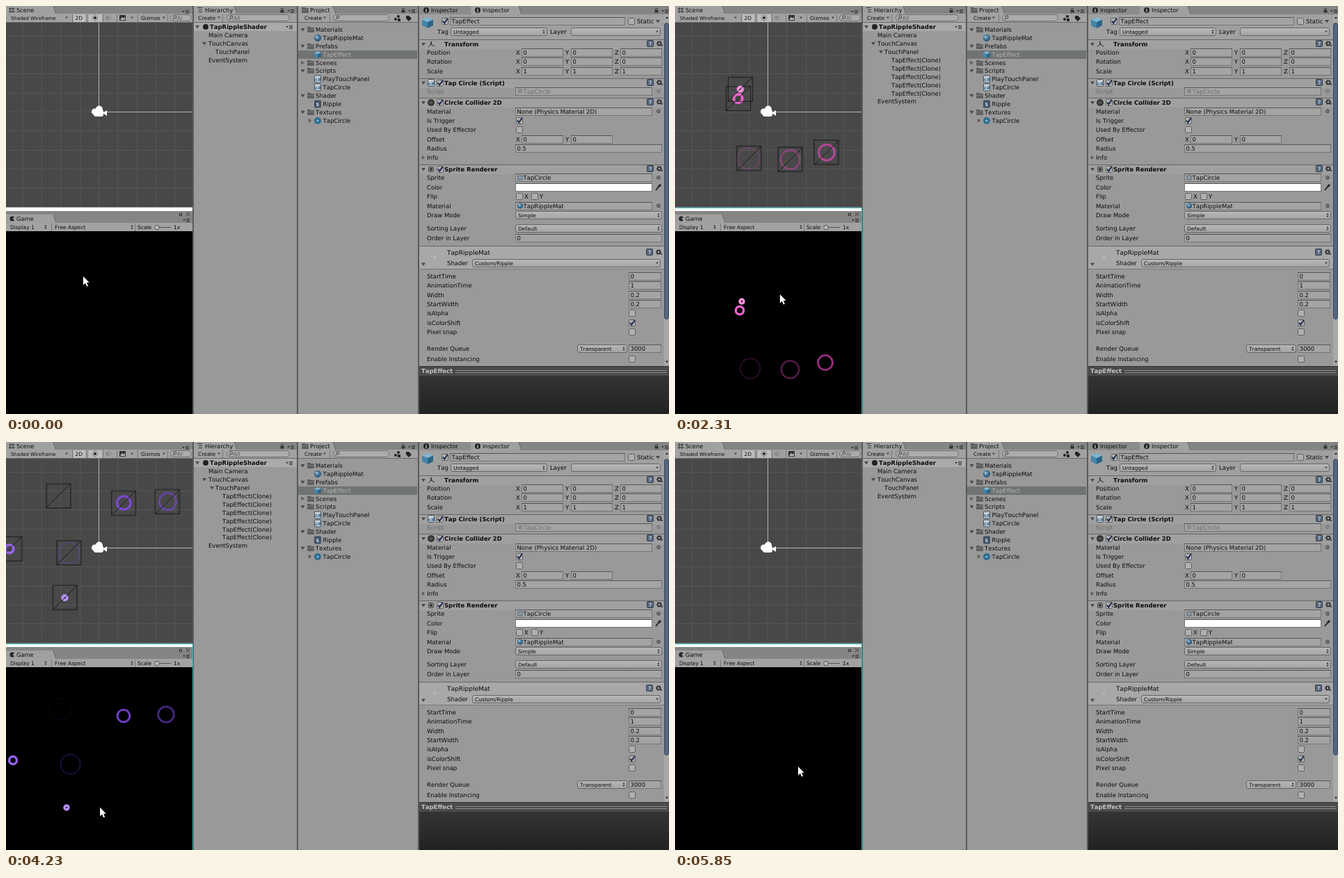
Write an HTML page with a canvas that moves like this. It is 953x587 px and loops after 6.31 s.

```html
<!DOCTYPE html>
<html lang="en">
<head>
<meta charset="utf-8">
<title>Tap ripple editor</title>
<style>
html, body { margin: 0; width: 100%; height: 100%; overflow: hidden; background: #999; }
canvas { display: block; width: 953px; height: 587px; }
</style>
</head>
<body>
<canvas id="stage" width="953" height="587"></canvas>
<script>
const LOOP = 6310, STEP = 76.75, LIFE = 1060, SCALE = 1.0345;
const view = document.getElementById('stage').getContext('2d');
const base = document.createElement('canvas');
base.width = 953;
base.height = 587;
let g = base.getContext('2d');
for (const c of [view, g]) {
  c.textRendering = 'geometricPrecision';
  c.fontKerning = 'none';
}

// Taps and pointer waypoints: time, x, y
const taps = [
  [250, 67, 366], [510, 207, 406], [760, 201, 452], [1010, 79, 457.5], [1210, 72, 476],
  [1410, 108, 521.5], [1540, 165.5, 523], [1700, 216, 513], [2030, 93, 438], [2200, 96, 425],
  [2350, 183, 420], [2540, 109, 483], [2670, 90, 515], [2880, 217, 475.5], [3120, 125, 335],
  [3260, 78, 384], [3350, 92.5, 463.5], [3560, 230, 392], [3730, 169, 394], [3960, 10, 458],
  [4120, 87, 526], [4340, 165, 497], [4500, 164.5, 436], [4700, 222, 495.5]
];
const path = taps.concat([
  [0, 111, 389], [90, 111, 389], [1466, 121, 523], [2311, 151, 415], [3078, 139, 343],
  [4229, 135, 526], [5100, 179, 469], [5300, 179, 469], [5800, 177, 467], [LOOP, 177, 467]
]).sort((a, b) => a[0] - b[0]);
const hues = [[0, 383], [1460, 347], [2310, 314], [3080, 287], [4230, 262], [5310, 233], [LOOP, 215]];

function sample(keys, t, col) {
  const i = Math.max(1, keys.findIndex(k => k[0] >= t));
  const a = keys[i - 1], b = keys[i];
  return a[col] + (b[col] - a[col]) * (t - a[0]) / (b[0] - a[0]);
}

function rect(x, y, w, h, fill) {
  g.fillStyle = fill;
  g.fillRect(x, y, w, h);
}
function text(s, x, y, size = 8.5, color = '#0c0c0c', bold = false) {
  g.font = `${bold ? 'bold ' : ''}${size}px "DejaVu Sans", sans-serif`;
  g.fillStyle = color;
  g.fillText(s, x, y + 3);
}
const bold = (s, x, y) => text(s, x, y, 8.5, '#0c0c0c', true);
function line(color, width, ...p) {
  g.strokeStyle = color;
  g.lineWidth = width;
  g.beginPath();
  for (let i = 0; i < p.length; i += 2) g.lineTo(p[i], p[i + 1]);
  g.stroke();
}
function poly(color, ...p) {
  g.fillStyle = color;
  g.beginPath();
  for (let i = 0; i < p.length; i += 2) g.lineTo(p[i], p[i + 1]);
  g.fill();
}
function disc(x, y, r, fill) {
  g.fillStyle = fill;
  g.beginPath();
  g.arc(x, y, r, 0, 7);
  g.fill();
}
function ring(x, y, r, w, color) {
  g.strokeStyle = color;
  g.lineWidth = w;
  g.beginPath();
  g.arc(x, y, r, 0, 2 * Math.PI);
  g.stroke();
}
function rounded(x, y, w, h, r, fill, edge) {
  g.beginPath();
  g.roundRect(x + .5, y + .5, w - 1, h - 1, r);
  g.fillStyle = fill;
  g.fill();
  g.strokeStyle = edge;
  g.lineWidth = 1;
  g.stroke();
}
const down = (x, y, r = 3, c = '#4a4a4a') => poly(c, x - r, y - r * .7, x + r, y - r * .7, x, y + r * .8);
const right = (x, y, r = 3, c = '#5c5c5c') => poly(c, x - r * .7, y - r, x + r * .8, y, x - r * .7, y + r);
function spin(x, y) {
  poly('#222', x - 1.6, y - .8, x + 1.6, y - .8, x, y - 3);
  poly('#222', x - 1.6, y + .8, x + 1.6, y + .8, x, y + 3);
}
function field(x, y, w, s, color) {
  y = Math.round(y);
  rect(x, y - 6, w, 12, '#a4a4a4');
  g.strokeStyle = '#747474';
  g.lineWidth = 1;
  g.strokeRect(x + .5, y - 5.5, w - 1, 11);
  rect(x, y - 6, w, 1, '#565656');
  if (s) text(s, x + 2.5, y, 8.5, color);
}
function popup(x, y, w, s, arrow = spin) {
  y = Math.round(y);
  const fill = g.createLinearGradient(0, y - 6, 0, y + 6);
  fill.addColorStop(0, '#b9b9b9');
  fill.addColorStop(1, '#a3a3a3');
  rounded(x, y - 6, w, 12, 2.5, fill, '#656565');
  text(s, x + 4, y, 7.5);
  arrow(x + w - 5, y, 2);
}
function check(x, y, on) {
  x = Math.round(x);
  y = Math.round(y);
  rounded(x - 5, y - 5, 10, 10, 1, '#b0b0b0', '#606060');
  if (on) line('#17264a', 1.9, x - 3, y - .5, x - .8, y + 2.5, x + 3.8, y - 4);
}
function search(x, y, w, s) {
  rounded(x, y - 5, w, 10, 5, '#ababab', '#707070');
  ring(x + 7, y - 1, 2, 1, '#444');
  line('#444', 1, x + 5.5, y + .5, x + 3.5, y + 3);
  text(s, x + 10, y, 7.5, '#555');
}
function lock(x, y) {
  rect(x - 2.5, y, 5, 3.5, '#333');
  ring(x, y - 1, 1.6, .9, '#333');
  menu(x + 12, y + 1);
}
function menu(x, y) {
  down(x - 3, y, 1.6, '#222');
  for (let i = -2; i < 3; i += 2) rect(x, y + i, 5, 1, '#333');
}
function gear(x, y) {
  y = Math.round(y) - 1;
  rounded(x - 18, y - 5, 10, 10, 1, '#56677c', '#333e4b');
  text('?', x - 15, y, 7.5, '#c3ccd6', true);
  ring(x, y, 2.4, 1.8, '#2e2e2e');
  for (let a = 0; a < 6; a++)
    line('#2e2e2e', 1.2, x, y, x + 4 * Math.cos(a * 1.05), y + 4 * Math.sin(a * 1.05));
  disc(x, y, 1.4, '#aaa');
  down(x + 4, y + 3, 1.5, '#222');
}
function folder(x, y) {
  rect(x - 5, y - 4, 5, 2, '#555');
  rect(x - 5, y - 3, 10, 7, '#606060');
  rect(x - 5, y - 1, 10, 1, '#777');
}
function script(x, y, s = 'c#') {
  rounded(x - 5, y - 5.5, 10, 11, 1, s === 'S' ? '#405064' : '#c5ccd2', '#44505c');
  text(s, x - (s === 'S' ? 2.5 : 4), y, 6.5, s === 'S' ? '#cfe6f5' : '#246089', true);
}
function sphere(x, y, r) {
  disc(x, y, r, '#2f5878');
  disc(x - r * .15, y - r * .2, r * .72, '#5588aa');
  disc(x - r * .3, y - r * .35, r * .3, '#9dc1d6');
}
function cube(x, y, r) {
  poly('#7fb4d2', x, y - r, x + r, y - r * .55, x, y - r * .1, x - r, y - r * .55);
  poly('#4585aa', x - r, y - r * .55, x, y - r * .1, x, y + r, x - r, y + r * .5);
  poly('#2b6485', x + r, y - r * .55, x, y - r * .1, x, y + r, x + r, y + r * .5);
}
function tab(x, y, w, s, tx) {
  poly('#a0a0a0', x, y, x + w - 4, y, x + w, y + 12, x, y + 12);
  line('#666', 1, x + w - 4, y, x + w, y + 12);
  text(s, tx, y + 6, 8.3);
}
function bar(x, y, w) {
  rect(x, y, w, 12, '#a2a2a2');
  rect(x, y + 12, w, 1, '#6a6a6a');
}

function sceneAndGame() {
  rect(0, 0, 268, 12, '#848484');
  tab(0, 0, 72, 'Scene', 15);
  for (let i = 0; i < 2; i++) {
    line('#333', 1, 6 + i * 4, 2, 6 + i * 4, 10);
    line('#333', 1, 4, 4 + i * 4, 13, 4 + i * 4);
  }
  menu(258, 8);
  bar(0, 11, 268);
  text('Shaded Wireframe', 7, 17, 6.9);
  down(87, 17, 2);
  rect(97, 12, 17, 11, '#bdbdbd');
  text('2D', 99.5, 17, 7.5);
  rect(119, 12, 19, 11, '#bdbdbd');
  disc(128, 17, 2, '#222');
  for (let a = 0; a < 8; a++) {
    const c = Math.cos(a * Math.PI / 4), s = Math.sin(a * Math.PI / 4);
    line('#333', .9, 128 + 3 * c, 17 + 3 * s, 128 + 4.6 * c, 17 + 4.6 * s);
  }
  poly('#888', 143, 15, 145, 15, 148, 13, 148, 22, 145, 19, 143, 19);
  ring(149, 17, 2.5, .8, '#888');
  rect(163, 13, 9, 8, '#333');
  poly('#bbb', 164, 20, 167, 16, 169, 18, 171, 16, 171, 20);
  down(181, 17, 2);
  text('Gizmos', 194, 17, 7.5);
  down(227, 17, 2);
  search(236, 17, 31, 'Al');
  for (const x of [95, 116, 139, 159, 189, 232]) rect(x, 12, 1, 11, '#777');

  rect(0, 24, 268, 265, '#484848');
  for (let i = -5; i < 6; i++) {
    const x = Math.round(133 + i * 27.3), y = Math.round(152 + i * 27.3);
    if (x >= 0 && x < 268) rect(x, 24, 1, 265, '#555');
    if (y > 24 && y < 289) rect(0, y, 268, 1, '#555');
  }
  rect(133, 24, 1, 128, '#b4b4b4');
  rect(133, 152, 135, 1, '#b4b4b4');

  rect(0, 289, 269, 23, '#858585');
  rect(0, 290, 269, 5, '#fff');
  tab(0, 300, 72, 'Game', 15);
  disc(9, 306, 3.5, '#222');
  poly('#a0a0a0', 9, 306, 14, 303, 14, 309);
  g.strokeStyle = '#333';
  g.strokeRect(249.5, 298.5, 3, 3);
  line('#333', 1, 259, 297, 264, 302);
  line('#333', 1, 264, 297, 259, 302);
  menu(259, 308);
  bar(0, 312, 269);
  text('Display 1', 6, 318, 7.5);
  spin(57, 318);
  text('Free Aspect', 70, 318, 7.5);
  spin(181, 318);
  text('Scale', 189, 318, 7.5);
  rect(215, 318, 22, 1, '#555');
  disc(217, 318.5, 3.5, '#555');
  disc(217, 318.5, 2.6, '#c0c0c0');
  text('1x', 241, 318, 7.5);
  rect(65, 313, 1, 11, '#777');
  rect(185, 313, 1, 11, '#777');
  rect(0, 324, 269, 263, '#000');
}

function hierarchyPanel() {
  rect(270, 0, 148, 12, '#848484');
  tab(270, 0, 62, 'Hierarchy', 286);
  for (let i = 0; i < 3; i++) rect(275 + (i && 2), 2 + i * 3, 7 - (i && 2), 1, '#333');
  lock(397, 6);
  bar(270, 11, 148);
  text('Create', 276, 17, 7.5);
  down(306, 17, 2);
  search(317, 17, 91, 'All');
  rect(311, 12, 1, 11, '#777');
  rect(270, 24, 148, 12, '#aaa');
  down(275, 30);
  disc(287, 30, 4, '#222');
  bold('TapRippleShader', 293, 30);
  menu(407, 30);
  text('Main Camera', 291, 42);
  down(285, 54);
  text('TouchCanvas', 291, 54);
  text('TouchPanel', 301, 66);
}

function projectPanel() {
  rect(420, 0, 172, 12, '#848484');
  tab(420, 0, 54, 'Project', 437);
  folder(430, 6);
  lock(571, 6);
  bar(420, 11, 172);
  text('Create', 429, 17, 7.5);
  down(458, 17, 2);
  search(470, 17, 81, '');
  rect(465, 12, 1, 11, '#777');
  disc(560, 19, 2, '#222');
  disc(564, 15, 2, '#222');
  rect(563, 18, 4, 4, '#222');
  poly('#222', 575, 14, 579, 14, 583, 18, 579, 22, 575, 18);
  rect(420, 64, 171, 12, '#707373');
  const rows = [
    ['Materials', 0], ['TapRippleMat', 1, (x, y) => sphere(x, y, 5)],
    ['Prefabs', 0], ['TapEffect', 1, (x, y) => cube(x, y, 5)], ['Scenes', 0], ['Scripts', 0],
    ['PlayTouchPanel', 1, script], ['TapCircle', 1, script], ['Shader', 0],
    ['Ripple', 1, (x, y) => script(x, y, 'S')], ['Textures', 0],
    ['TapCircle', 1, (x, y) => { disc(x, y, 5, '#2d6d8f'); disc(x, y, 1.6, '#8dbdd2'); }]
  ];
  rows.forEach(([name, depth, icon], i) => {
    const y = 34 + i * 11.88;
    if (!depth) {
      (name === 'Scenes' ? right : down)(426.5, y);
      folder(438, Math.round(y));
    } else icon(448, Math.round(y));
    text(name, depth ? 455.5 : 445, y, 8.5, i === 3 ? '#b6b6b6' : '#0c0c0c');
  });
  right(437, 164.7);
}

function header(y, name, on, icon) {
  rect(594, Math.round(y) - 7, 352, 1, '#666');
  rect(594, Math.round(y) - 6, 352, 13, '#a0a0a0');
  down(600, y);
  icon(611, y);
  if (on) check(624, y, true);
  bold(name, 630, y);
  gear(939, y);
}
function vector(y, values, label) {
  text(label, 605, y);
  values.forEach((v, i) => {
    text('XYZ'[i], 733 + i * 71, y);
    field(741 + i * 71, y, 60, v);
  });
}
function row(label, y, value) {
  text(label, 605, y);
  if (value !== undefined) field(732, y, 211, value);
}
function objectRow(label, y, value, icon, color) {
  text(label, 605, y, 8.5, color);
  field(732, y, 197, icon ? '' : value, color);
  if (icon) {
    icon(739, y);
    text(value, 743.5, y, 8.5, color);
  }
  ring(938, y, 2.3, 1, color || '#333');
  disc(938, y, .8, color || '#333');
}

function inspectorPanel() {
  rect(594, 0, 359, 12, '#848484');
  rect(594, 0, 74, 12, '#8c8c8c');
  tab(668, 0, 73, 'Inspector', 685);
  text('Inspector', 611, 6, 8.3);
  for (const x of [604, 678]) {
    disc(x, 6, 4, '#222');
    text('i', x - 1.2, 6, 7, '#ddd', true);
  }
  lock(935, 6);
  rect(594, 12, 352, 36, '#a0a0a0');
  cube(606, 24, 8);
  check(631, 22, true);
  field(638, 22, 252, 'TapEffect');
  check(899, 22, false);
  text('Static', 907, 22);
  down(937, 22);
  text('Tag', 620, 37);
  popup(639, 37, 139, 'Untagged');
  text('Layer', 782, 37);
  popup(812, 37, 129, '', down);

  header(55, 'Transform', false, (x, y) => line('#222', 1, x - 4, y + 4, x, y, x, y - 4, x, y, x + 5, y + 3));
  vector(67, ['0', '0', '0'], 'Position');
  vector(80, ['0', '0', '0'], 'Rotation');
  vector(93.5, ['1', '1', '1'], 'Scale');

  header(110.5, 'Tap Circle (Script)', true, script);
  objectRow('Script', 122.5, 'TapCircle', (x, y) => rect(x - 3, y - 3, 6, 6, '#888'), '#6b6b6b');

  header(139, 'Circle Collider 2D', true, (x, y) => { disc(x, y, 5, '#333'); disc(x, y, 2.5, '#555048'); });
  objectRow('Material', 151.5, 'None (Physics Material 2D)');
  row('Is Trigger', 165);
  check(738, 165, true);
  row('Used By Effector', 178);
  check(738, 178, false);
  vector(191.5, ['0', '0'], 'Offset');
  row('Radius', 205, '0.5');
  right(600, 218);
  text('Info', 605, 218);

  header(235, 'Sprite Renderer', true, (x, y) => {
    rounded(x - 4, y - 4, 8, 8, 1, '#888', '#444');
    disc(x, y, 2, '#333');
  });
  objectRow('Sprite', 247, 'TapCircle', (x, y) => rounded(x - 3.5, y - 3.5, 7, 7, 0, '#8d9aa3', '#536574'));
  row('Color', 260.5);
  field(732, 260.5, 197);
  rect(733, 256, 195, 10, '#fff');
  line('#222', 2, 934, 265, 938, 260);
  line('#222', 3, 938, 260, 941, 257);
  row('Flip', 274);
  check(738, 274, false);
  text('X', 745, 274);
  check(760, 274, false);
  text('Y', 767, 274);
  objectRow('Material', 287.5, 'TapRippleMat', (x, y) => sphere(x, y, 4));
  row('Draw Mode', 300.5);
  popup(732, 300.5, 211, 'Simple');
  row('Sorting Layer', 320);
  popup(732, 320, 211, 'Default');
  row('Order in Layer', 333.5, '0');

  rect(594, 345, 352, 1, '#666');
  rect(594, 346, 352, 32, '#a8a8a8');
  rect(594, 378, 352, 1, '#777');
  disc(616.5, 361.5, 2, '#b9b9b9');
  down(600, 371.5);
  text('TapRippleMat', 634, 355, 9);
  gear(938, 355);
  text('Shader', 634, 369.5);
  popup(670, 369.5, 271, 'Custom/Ripple', down);
  [['StartTime', '0'], ['AnimationTime', '1'], ['Width', '0.2'], ['StartWidth', '0.2'],
    ['isAlpha', false], ['isColorShift', true], ['Pixel snap', false]].forEach(([label, v], i) => {
    const y = 389 + i * 13.35;
    row(label, y);
    if (typeof v === 'string') field(895, y, 47, v);
    else check(900, y, v);
  });
  row('Render Queue', 492.5);
  popup(821, 492.5, 72, 'Transparent');
  field(895, 492.5, 47, '3000');
  row('Enable Instancing', 507.5);
  check(900, 507.5, false);

  rect(946, 12, 7, 506, '#a8a8a8');
  rounded(946, 24, 7, 427, 3, '#566681', '#39465d');
  poly('#222', 948, 18, 952, 18, 950, 15);
  down(950, 512, 2, '#222');

  rect(594, 518, 359, 14, '#4b4b4b');
  rect(594, 518, 359, 1, '#333');
  text('TapEffect', 597, 525, 8.5, '#c2c2c2', true);
  rect(646, 524, 304, 1, '#8c8c8c');
  rect(646, 527, 304, 1, '#8c8c8c');
  const dark = g.createLinearGradient(0, 532, 0, 587);
  dark.addColorStop(0, '#343434');
  dark.addColorStop(1, '#222');
  rect(594, 532, 359, 55, dark);
}

function ripple(x, y, p, hue, size) {
  const r = (3 + 16 * p - 2.5 * p * p) * size;
  const w = Math.min(r, (3.8 - 1.8 * p) * size);
  const light = 60 + 26 * (1 - p) ** 4;
  ring(x, y, r - w / 2, w, `hsla(${hue}, 85%, ${light}%, ${Math.min(1, 1.7 * (1 - p))})`);
}
function gizmo(x, y) {
  const near = (v, c) => c + (v - c) * .985;
  const l = x - 17.5, t = y - 17.5, r = x + 17.5, b = y + 17.5;
  const box = (l, t, r, b, a) => line(`rgba(16,16,16,${a})`, .9, l, t, r, t, r, b, l, b, l, t);
  box(l, t, r, b, .6);
  box(near(l, 133), near(t, 152), near(r, 133), near(b, 152), .45);
  line('rgba(16,16,16,.85)', 1, l, b, r, t);
}
function camera() {
  disc(127.5, 152, 4.5, '#fff');
  disc(134, 148.5, 5, '#fff');
  rounded(126, 149, 14, 10, 2, '#fff', '#fff');
  poly('#fff', 139, 154, 145, 150, 145, 158);
}
function pointer(x, y) {
  g.save();
  g.translate(x, y);
  poly('#fff', 0, 0, 0, 12.5, 3, 9.8, 5, 14.5, 7, 13.6, 5, 9, 8.6, 8.8);
  g.restore();
}

function draw(t) {
  g.drawImage(base, 0, 0);
  const hue = sample(hues, t, 1);
  const live = taps.filter(k => t >= k[0] && t - k[0] < LIFE);
  const shown = live.filter(k => t - k[0] < 1000)
    .map(([at, x, y]) => ({ x, y, p: (t - at) / 1000, sx: 69 + (x - 72) * SCALE, sy: 219 + (y - 521) * SCALE }));

  g.save();
  g.beginPath();
  g.rect(0, 24, 268, 265);
  g.clip();
  for (const s of shown) {
    ripple(s.sx, s.sy, s.p, hue, 1.08);
    gizmo(s.sx, s.sy);
  }
  camera();
  g.restore();

  if (t >= taps[0][0]) {
    rect(0, 290, 269, 1, '#2ab4b8');
    rect(268, 291, 1, 296, '#2ab4b8');
  }
  g.save();
  g.beginPath();
  g.rect(0, 324, 268, 263);
  g.clip();
  for (const s of shown) ripple(s.x, s.y, s.p, hue, 1);
  pointer(sample(path, t, 1), sample(path, t, 2));
  g.restore();

  const n = live.length;
  if (n) down(296, 66);
  for (let i = 0; i < n; i++) text('TapEffect(Clone)', 311, 78 + i * 11.88);
  text('EventSystem', 291, 78 + n * 11.88);
}

rect(0, 0, 953, 587, '#999');
sceneAndGame();
hierarchyPanel();
projectPanel();
inspectorPanel();
for (const x of [268, 418, 592]) rect(x, 0, 2, 587, '#5a5a5a');
g = view;

const start = performance.now();
function tick(now) {
  const t = Math.max(0, now - start) % LOOP;
  const n = Math.min(75, Math.floor((t - 75) / STEP));
  draw(t < 90 ? 0 : 85 + n * STEP);
  requestAnimationFrame(tick);
}
requestAnimationFrame(tick);
</script>
</body>
</html>
```
